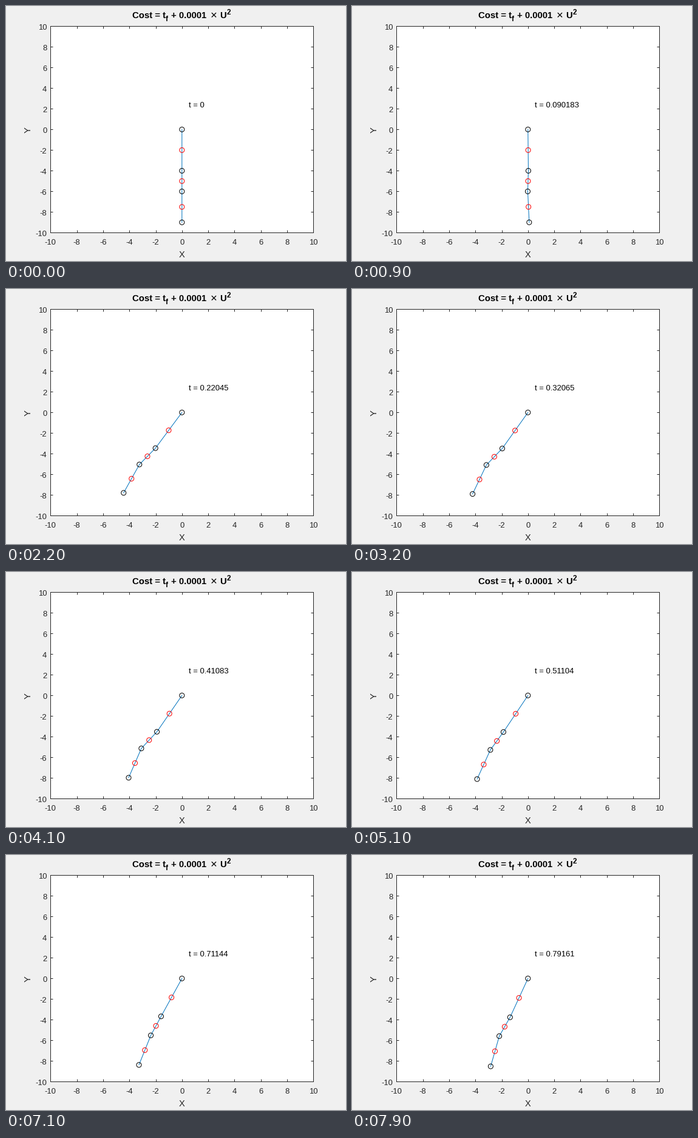
Animation of 560 by 420 pixels, one loop 8 s. Source, as a matplotlib script:

```python
import numpy as np
import matplotlib.pyplot as plt
from matplotlib.animation import FuncAnimation

W, H, DPI = 560, 420, 100
PX = 72 / DPI                      # one pixel in points
FRAMES, INTERVAL = 80, 100
DT = 0.01002033                    # simulated seconds per frame
LENGTHS = np.array([4, 2, 3])
INK = "#262626"

plt.rcParams["font.family"] = "Liberation Sans"

# Link angles from straight down (positive to the left) at key steps
KEYS = np.array([0, 5, 9, 14, 18, 22, 41, 51, 63, 79])
ANGLES = np.array([
    [0, .183, -.0075, .590, .534, .528, .4964, .485, .456, .3475],
    [0, .183, .023, .700, .664, .657, .634, .5206, .388, .422],
    [0, .183, -.037, .450, .425, .412, .328, .343, .3577, .2198],
])


def key_slopes(y):
    """Monotone slopes: harmonic mean of the secants, zero at extremes."""
    d = np.diff(y) / np.diff(KEYS)
    a, b = d[:-1], d[1:]
    same = a * b > 0
    inner = np.where(same, 2 * a * b / np.where(same, a + b, 1), 0)
    return np.concatenate([[0], inner, [d[-1]]])


SLOPES = np.array([key_slopes(y) for y in ANGLES])


def pose(k):
    """Joint positions of the arm at step k, one row per joint."""
    i = min(np.searchsorted(KEYS, k, side="right") - 1, len(KEYS) - 2)
    h = KEYS[i + 1] - KEYS[i]
    s = (k - KEYS[i]) / h
    phi = ((1 + 2 * s) * (1 - s) ** 2 * ANGLES[:, i]
           + s * (1 - s) ** 2 * h * SLOPES[:, i]
           + s * s * (3 - 2 * s) * ANGLES[:, i + 1]
           + s * s * (s - 1) * h * SLOPES[:, i + 1])
    links = -LENGTHS * np.array([np.sin(phi), np.cos(phi)])
    return np.vstack([[0, 0], np.cumsum(links.T, axis=0)])


fig = plt.figure(figsize=(W / DPI, H / DPI), dpi=DPI, facecolor="#f0f0f0")


def label(x, y, text, size, **kw):
    """Text at a pixel position counted from the top left."""
    return fig.text(x / W, 1 - y / H, text, fontsize=size * PX, **kw)


left, right, top, bottom = 73.3, 506.3, 33.3, 373.4
ax = fig.add_axes([left / W, 1 - bottom / H,
                   (right - left) / W, (bottom - top) / H])
ticks = range(-10, 11, 2)
ax.set(xlim=(-10, 10), ylim=(-10, 10), xticks=ticks, yticks=ticks)
ax.tick_params(direction="in", top=True, right=True, length=4.3 * PX,
               width=PX, color=INK, labelbottom=False, labelleft=False)
for spine in ax.spines.values():
    spine.set(linewidth=PX, edgecolor=INK)

for t in ticks:
    f = (t + 10) / 20
    label(left + f * (right - left), 392.6, str(t), 13, color=INK, ha="center")
    label(67.3, bottom - f * (bottom - top) + 5.6, str(t), 13, color=INK,
          ha="right")

# Title, set in runs for the subscript and the superscript
label(207.5, 20, "Cost = t", 14.9, weight="bold")
label(263.2, 25, "f", 11.7, weight="bold")
label(272.5, 20, "+ 0.0001", 14.9, weight="bold")
label(337, 21.4, "×", 18.5)
label(352.5, 20, "U", 14.9, weight="bold")
label(363.7, 13.5, "2", 11.7, weight="bold")

label(289.8, 414, "X", 14.67, color=INK, ha="center")
label(36.5, 204, "Y", 14.9, color=INK, ha="center", va="center", rotation=90)
clock = label(301, 167.3, "", 13, color="black")

arm, = ax.plot([], [], color="#0072bd", lw=PX, snap=False)
# Four black joints, then three red centres of mass
rings = ax.scatter(np.zeros(7), np.zeros(7), s=(8 * PX) ** 2,
                   facecolors="none", linewidths=PX, zorder=3,
                   edgecolors=["black"] * 4 + ["red"] * 3)


def draw(k):
    joints = pose(k)
    masses = (joints[:-1] + joints[1:]) / 2
    arm.set_data(joints[:, 0], joints[:, 1])
    rings.set_offsets(np.vstack([joints, masses]))
    clock.set_text(f"t = {k * DT:.5g}")
    return arm, rings, clock


anim = FuncAnimation(fig, draw, frames=FRAMES, interval=INTERVAL,
                     repeat=True, repeat_delay=0)
plt.show()
```
